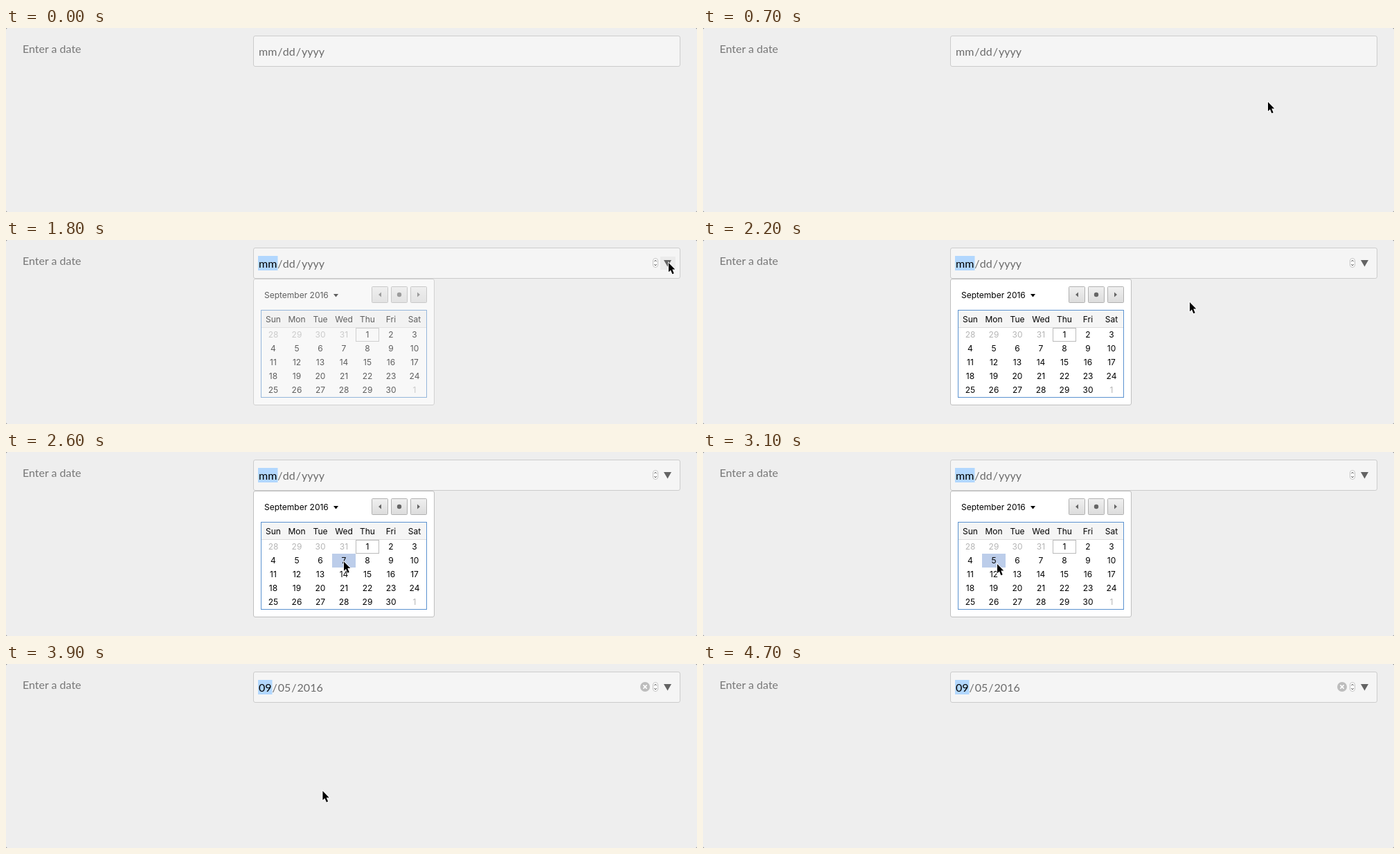
These frames come from a looping animation (998x266 px, 4.9 s). An HTML page:

```html
<!DOCTYPE html>
<html lang="en">
<head>
<meta charset="utf-8">
<style>
  html, body { margin: 0; width: 100%; height: 100%; overflow: hidden; background: #777; }
  svg { display: block; width: 998px; height: 266px; }
  .form { font: 16px Lato, sans-serif; fill: #6b6b6b; white-space: pre; }
  .picker { font: 12px Inter, sans-serif; fill: #000; }
  .days { text-anchor: middle; }
  .muted { fill: #b5b5b5; }
</style>
</head>
<body>
<svg viewBox="0 0 998 266">
  <defs>
    <linearGradient id="face" x2="0" y2="1">
      <stop stop-color="#f0f0f0"/><stop offset="1" stop-color="#dcdcdc"/>
    </linearGradient>
  </defs>
  <rect width="998" height="266" rx="2.5" fill="#eee"/>
  <text class="form" x="24" y="36" style="fill:#777">Enter a date</text>
  <rect x="357.5" y="11.5" width="616" height="44" rx="2.5" fill="#f5f5f5" stroke="#ccc"/>
  <rect id="selection" x="364" y="23" height="21" fill="#b2d7fe"/>
  <g class="form" id="value"></g>

  <g id="controls">
    <rect id="arrowHover" x="945" y="24" width="22" height="19" fill="#ebebeb"/>
    <rect x="934.5" y="26.5" width="7" height="13" rx="3.5" fill="#fff" stroke="#c4c4c4"/>
    <path d="M936.3 31.2l1.7-2 1.7 2M936.3 35l1.7 2 1.7-2" fill="none" stroke="#555"/>
    <path d="M950 29h11l-5.5 9.5z" fill="#636363"/>
  </g>
  <g id="clear">
    <circle cx="923" cy="33" r="7" fill="#bdbdbd"/>
    <path d="M920.4 30.4l5.2 5.2m0-5.2l-5.2 5.2" stroke="#fff" stroke-width="1.6"/>
  </g>

  <g id="popup" class="picker">
    <rect x="357.5" y="56.5" width="261" height="182" rx="2.5" fill="#fff" stroke="#bfbfbf"/>
    <text x="373" y="84">September 2016</text>
    <path d="M473 78h7l-3.5 4.5z"/>
    <g fill="url(#face)" stroke="#b0b0b0">
      <rect x="528.5" y="67.5" width="23" height="23" rx="1"/>
      <rect x="556.5" y="67.5" width="23" height="23" rx="1"/>
      <rect x="584.5" y="67.5" width="23" height="23" rx="1"/>
    </g>
    <g fill="#666">
      <path d="M542 75.5v7l-4-3.5zM594 75.5v7l4-3.5z"/>
      <circle cx="568" cy="79" r="3.2"/>
    </g>
    <rect x="368" y="101" width="240" height="26" fill="#f5f5f5"/>
    <path d="M368 126.5h240" stroke="#ddd"/>
    <rect id="dayHover" width="34" height="20" fill="#bccdea"/>
    <rect x="505.5" y="127.5" width="33" height="19" fill="none" stroke="#bbb"/>
    <rect x="368.5" y="101.5" width="239" height="126" fill="none" stroke="#5b92d0"/>
    <g id="days" class="days"></g>
  </g>

  <circle id="click" cx="958" cy="35" r="22.5" fill="#fff" fill-opacity=".3" stroke="#000" stroke-width="1.5"/>
  <path id="cursor" d="M0 0V13.2l3-2.8 2.4 5.8 2.3-1-2.4-5.6H9.3z" stroke="#fff" stroke-width="1.6" paint-order="stroke"/>
</svg>
<script>
const $ = id => document.getElementById(id);
const LOOP = 4900, STEP = 100;
const CLICK = 1700, OPEN = 1800, PICK = 3200;
const CELL = { x: 369, y: 127, w: 34, h: 20 };

// cursor tip: time, x, y
const path = [
  [700, 816, 107], [800, 824, 103], [1100, 920, 57], [1200, 940, 44],
  [1400, 957, 33], [1800, 957, 33], [1900, 935, 38], [2200, 703, 90],
  [2500, 530, 148], [2700, 446, 169], [2900, 425, 162], [3700, 425, 162],
  [4200, 506, 216], [4400, 498, 270]
];

function tipAt(t) {
  const i = path.findIndex(p => p[0] > t);
  if (i < 1) return null;
  const [t0, x0, y0] = path[i - 1], [t1, x1, y1] = path[i];
  const k = (t - t0) / (t1 - t0);
  return { x: x0 + (x1 - x0) * k, y: y0 + (y1 - y0) * k };
}

const label = (x, y, text, cls = "") => `<text x="${x}" y="${y}" class="${cls}">${text}</text>`;

function buildDays() {
  const mid = col => CELL.x + 17 + col * CELL.w;
  let out = ["Sun", "Mon", "Tue", "Wed", "Thu", "Fri", "Sat"]
    .map((name, col) => label(mid(col), 119, name)).join("");
  for (let i = 0; i < 35; i++) {
    const d = new Date(2016, 7, 28 + i);
    out += label(mid(i % 7), CELL.y + 14 + Math.floor(i / 7) * CELL.h,
      d.getDate(), d.getMonth() === 8 ? "" : "muted");
  }
  $("days").innerHTML = out;
}

const show = (id, on) => $(id).style.display = on ? "" : "none";

let shown = "";
function setValue(parts, focused) {
  const key = parts + focused;
  if (key === shown) return;
  shown = key;
  const [a, b, c] = parts;
  $("value").innerHTML = `<text x="365" y="40"><tspan fill="${focused ? "#000" : "#6b6b6b"}">${a}</tspan>` +
    `<tspan dx="1">/</tspan><tspan dx="1">${b}</tspan><tspan dx="1">/</tspan><tspan dx="1">${c}</tspan></text>`;
}

function draw(now) {
  const t = Math.floor(now % LOOP / STEP) * STEP;
  const tip = tipAt(t), focused = t >= CLICK, picked = t >= PICK;
  const open = t >= OPEN && !picked;

  setValue(picked ? ["09", "05", "2016"] : ["mm", "dd", "yyyy"], focused);
  show("selection", focused);
  $("selection").setAttribute("width", picked ? 20.5 : 28.5);
  show("controls", t >= 1200);
  show("arrowHover", tip && tip.x > 945 && tip.y < 43);
  show("clear", picked);
  show("click", t === CLICK);

  show("popup", open);
  $("popup").style.opacity = t === OPEN ? 0.6 : 1;
  show("cursor", tip);
  if (tip) $("cursor").setAttribute("transform", `translate(${tip.x} ${tip.y})`);

  const col = tip ? Math.floor((tip.x - CELL.x) / CELL.w) : -1;
  const row = tip ? Math.floor((tip.y - CELL.y) / CELL.h) : -1;
  const over = col >= 0 && col < 7 && row >= 0 && row < 5;
  show("dayHover", over);
  if (over) {
    $("dayHover").setAttribute("x", CELL.x + col * CELL.w);
    $("dayHover").setAttribute("y", CELL.y + row * CELL.h);
  }
}

buildDays();
const start = performance.now();
function tick() {
  draw(performance.now() - start);
  requestAnimationFrame(tick);
}
tick();
</script>
</body>
</html>
```
